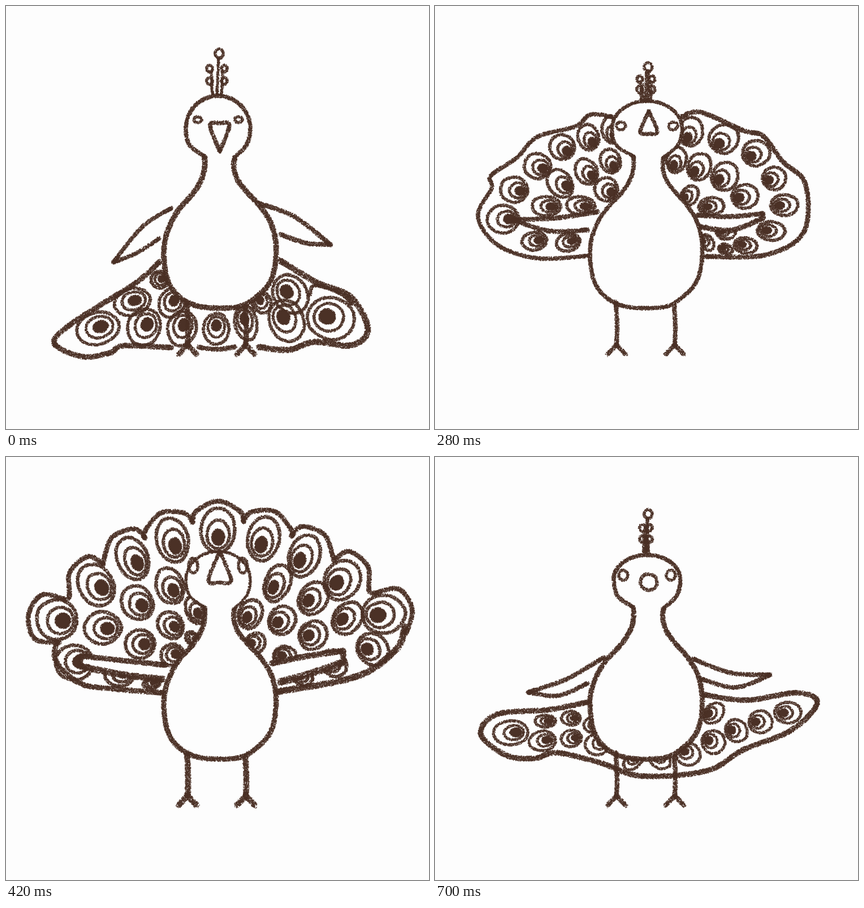
These frames come from a looping animation (748 px wide and 748 px high, 0.84 s). An HTML page with a canvas:

```html
<!DOCTYPE html>
<html lang="en">
<head>
<meta charset="utf-8">
<title>Peacock</title>
<style>
html, body { margin: 0; width: 100%; height: 100%; overflow: hidden; background: #fdfdfd; }
canvas { display: block; width: 748px; height: 748px; }
</style>
</head>
<body>
<canvas id="stage" width="748" height="748"></canvas>
<script>
const SIZE = 748, HOLD = 140, INK = '#4b3126', PAPER = '#fdfdfd', MID = 375;
let g, seed;

function rnd() {
  seed = (seed * 1664525 + 1013904223) >>> 0;
  return seed / 4294967296;
}

const parse = s => s.trim().split(/\s+/).map(p => p.split(',').map(Number));

// Catmull-Rom curve sampled about once per pixel; extra values per point blend along
function smooth(pts, closed) {
  const n = pts.length, out = [];
  const at = i => closed ? pts[(i + n) % n] : pts[Math.max(0, Math.min(n - 1, i))];
  for (let i = 0; i < (closed ? n : n - 1); i++) {
    const a = at(i - 1), b = at(i), c = at(i + 1), d = at(i + 2);
    const steps = Math.max(1, Math.round(Math.hypot(c[0] - b[0], c[1] - b[1])));
    for (let k = 0; k < steps; k++) {
      const t = k / steps;
      out.push(b.map((v, j) => v + 0.5 * ((c[j] - a[j]) * t
        + (2 * a[j] - 5 * v + 4 * c[j] - d[j]) * t * t
        + (3 * v - a[j] - 3 * c[j] + d[j]) * t * t * t)));
    }
  }
  out.push(at(closed ? 0 : n - 1));
  return out;
}

// Crayon grain: small specks scattered over the width of the line
function chalk(curve, w, density = 1.5) {
  g.fillStyle = INK;
  for (const [x, y] of curve) {
    for (let i = rnd(); i < w * density; i++) {
      const r = Math.sqrt(rnd()) * w * 0.54, a = rnd() * 6.283, s = 0.9 + rnd() * 0.7;
      g.fillRect(x + r * Math.cos(a) - s / 2, y + r * Math.sin(a) - s / 2, s, s);
    }
  }
}

const line = (pts, w, density) => chalk(smooth(pts), w, density);
const draw = (text, w, density) => line(parse(text), w, density);

function mask(curve) {
  g.fillStyle = PAPER;
  g.beginPath();
  curve.forEach(p => g.lineTo(p[0], p[1]));
  g.fill();
}

function ring(x, y, rx, ry, w = 5, rot = 0) {
  const pts = [], c = Math.cos(rot), s = Math.sin(rot);
  for (let i = 0; i < 10; i++) {
    const a = i * Math.PI / 5, k = 0.97 + rnd() * 0.06;
    const u = rx * k * Math.cos(a), v = ry * k * Math.sin(a);
    pts.push([x + u * c - v * s, y + u * s + v * c]);
  }
  chalk(smooth(pts, true), w, 1.25);
}

function dot(x, y, rx, ry, rot) {
  g.fillStyle = INK;
  g.beginPath();
  g.ellipse(x, y, rx, ry, rot, 0, 7);
  g.fill();
  ring(x, y, rx, ry, 3, rot);
}

// Rows of feather eyes: each one tilts half-way to the hub, its pupil slides towards it
function feathers([hx, hy], lean, w, mid, pupil) {
  const eye = ([x, y, rx, ry]) => {
    const dx = hx - x, dy = hy - y, far = Math.hypot(dx, dy);
    const rot = (rx > ry ? Math.atan(dy / dx) : Math.atan(-dx / dy)) / 2;
    const px = x + dx / far * ry * lean, py = y + dy / far * ry * lean;
    ring(x, y, rx - w / 2, ry - w / 2, w, rot);
    ring(x + (px - x) * 0.6, y + (py - y) * 0.6, rx * mid, ry * mid, w * 0.9, rot);
    dot(px, py, rx * pupil, ry * pupil, rot);
  };
  // Knots are x,y,rx,ry; gaps along the row follow the eye width
  return (knots, count) => {
    const curve = smooth(parse(knots)), eyes = [curve[0]], way = [0];
    for (let i = 1; i < curve.length; i++) {
      const [a, b] = [curve[i - 1], curve[i]];
      way.push(way[i - 1] + Math.hypot(b[0] - a[0], b[1] - a[1]) / b[2]);
    }
    for (let i = 1; i < count; i++) {
      const goal = way[way.length - 1] * i / (count - 1) - 1e-6;
      eyes.push(curve[way.findIndex(v => v >= goal)]);
    }
    eyes.forEach(eye);
    return eyes;
  };
}

// One scallop around the outer side of each eye
function scallops(eyes, [hx, hy], reach, w) {
  const polar = ([x, y]) => [Math.atan2(y - hy, x - hx), Math.hypot(x - hx, y - hy)];
  const spot = (a, r) => [hx + r * Math.cos(a), hy + r * Math.sin(a)];
  const valley = (p, q) => {
    const [a, r] = polar([(p[0] + q[0]) / 2, (p[1] + q[1]) / 2]);
    return spot(a, r + reach * 0.45);
  };
  eyes.forEach((e, i) => {
    const [a] = polar(e), arc = [];
    for (const turn of [-0.85, 0, 0.85]) {
      arc.push([e[0] + reach * 0.98 * Math.cos(a + turn), e[1] + reach * Math.sin(a + turn)]);
    }
    if (i > 0) arc.unshift(valley(eyes[i - 1], e));
    else arc.unshift([e[0] + 5, e[1] + 40]);
    if (i < eyes.length - 1) arc.push(valley(e, eyes[i + 1]));
    else arc.push([e[0] + 36, e[1] + 30]);
    line(arc, w);
  });
}

// Head is an arc; the belly sways sideways below the neck
function body(sway, top, half, w, headW) {
  const belly = parse(`404,268 403,288 411,310 428,331 450,355 468,383 477,418 476,457 467,488
    447,511 415,531 365,534 330,528 304,512 287,488 280,455 280,422 288,392 304,362
    331,331 345,308 351,287 351,266`)
    .map(([x, y]) => [x + sway * Math.max(0, Math.min(1, (y - 300) / 100)), y]);
  const head = [];
  for (let a = 210; a >= -30; a -= 24) {
    const t = a * Math.PI / 180, s = Math.sin(t);
    head.push([MID + half * Math.cos(t), 217 - s * (s > 0 ? 217 - top : 60)]);
  }
  mask(smooth([...head, ...belly], true));
  line([belly[belly.length - 1], ...head, belly[0]], headW);
  line(belly, w);
}

function legs(w) {
  for (const [x, top] of [[320, 523], [423, 530]]) {
    line([[x, top], [x + 2, 565], [x + 1, 600]], w);
    for (const side of [-1, 1]) line([[x + 1, 599], [x + 1 + side * 16, 616]], w);
  }
}

// Two sagging strokes from the shoulder to the tip and back
function wing(top, tip, low, sagTop, sagLow, w, blunt = 0) {
  const stroke = (a, b, sag) => smooth([a, [(a[0] + b[0]) / 2, (a[1] + b[1]) / 2 + sag], b]);
  const up = [tip[0], tip[1] - blunt], down = [tip[0], tip[1] + blunt];
  const upper = stroke(top, up, sagTop), lower = stroke(down, low, sagLow);
  mask([...upper, ...lower]);
  chalk(upper, w);
  chalk(lower, w + blunt / 4);
  if (blunt) line([up, down], w);
}

function face(gap, y, rx, ry) {
  for (const side of [-1, 1]) ring(MID + side * gap, y, rx, ry, 5);
}

function beak(tip, base, half, w) {
  const x = 378, point = [x, tip], bow = Math.sign(base - tip) * 4;
  chalk(smooth([point, point, [x + half, base], [x, base + bow], [x - half, base]], true), w);
}

function crest(top, base, spread, stem) {
  const x = 373, h = base - top;
  ring(x + 4, top + 8, 7, 8, 5);
  line([[x, base], [x + 3, top + 15]], stem);
  for (const part of [0.43, 0.7]) {
    for (const side of [-1, 1]) {
      const y = top + h * part, bx = x + side * spread;
      ring(bx, y, 5, 6, 5);
      line([[x + side * spread * 0.6, base], [bx - side * 3, y + 5]], stem, 0.8);
    }
  }
}

function resting() {
  const row = feathers([378, 440], 0.2, 5.5, 0.6, 0.32);
  draw('272,452 232,488 170,527 105,570 86,598 135,620 185,613 206,601 292,604', 9);
  draw('340,603 372,607 405,603', 8);
  draw('447,603 500,608 545,594 610,600 640,572 610,515 550,489 484,450', 10);
  draw('537,512 546,494 590,508 612,528', 6);
  row('162,570,41,31 248,568,31,36 374,571,25,30 424,560,22,34', 5);
  row('223,523,35,26 293,525,25,29', 2);
  row('272,484,18,18', 1);
  row('452,524,19,22 503,509,32,38', 2);
  row('496,556,33,40 575,553,44,40', 2);
  wing([293, 357], [190, 453], [271, 411], -15, 5, 7);
  wing([444, 348], [574, 422], [486, 404], -13, 6, 8);
  body(0, 159, 57, 9, 7);
  legs(9);
  face(36, 201, 7, 5);
  beak(257, 211, 17, 7);
  crest(76, 157, 13, 5);
}

function rising() {
  const row = feathers([375, 465], 0.38, 5, 0.52, 0.3);
  draw(`272,433 200,447 110,455 81,490 125,527 175,533 215,523 290,540 365,564 480,555
    545,518 630,483 676,435 640,417 550,430 474,420`, 9);
  row('134,488,33,24', 1);
  row('195,467,21,13 243,462,19,15 276,474,15,15', 3);
  row('190,502,26,20 245,498,20,17 287,508,24,21', 3);
  row('350,538,21,15 448,525,25,22 525,487,21,23 624,452,26,21', 7);
  row('493,453,18,23', 1);
  wing([299, 354], [165, 416], [270, 400], 8, 14, 7.5);
  wing([456, 357], [593, 385], [470, 392], 11, 19, 7.5);
  body(-5, 173, 59, 8.5, 7);
  legs(8);
  face(42, 209, 8, 9);
  ring(378, 221, 15, 14, 6);
  crest(93, 168, 6, 6);
}

function spreading() {
  const row = feathers([378, 370], 0.42, 5.5, 0.53, 0.3);
  draw('314,196 275,192 248,213 180,232 145,268 99,300 100,322 76,372 110,422 180,446 270,442', 7);
  draw('436,196 470,188 545,220 580,230 615,275 655,315 652,400 585,440 478,443', 8);
  row('140,325,27,25 215,255,25,25 311,220,18,26', 5);
  row('221,314,23,29 310,274,20,24', 3);
  row('197,354,28,20 262,352,28,19 303,324,23,23', 3);
  row('120,377,31,27 170,414,25,19 235,418,24,18', 3);
  row('452,222,24,28 508,234,29,28 568,260,27,25', 3);
  row('427,272,20,25 514,302,26,28 548,337,26,24', 4);
  row('450,335,17,21 489,354,25,18', 2);
  row('600,305,23,23 618,370,28,20 563,418,25,18 514,430,15,11', 5);
  row('514,399,20,16 481,418,13,18', 2);
  wing([288, 364], [137, 378], [270, 396], 4, 11, 8);
  wing([463, 370], [580, 371], [467, 390], 4, 14, 8, 4);
  body(-5, 168, 62, 7, 6);
  legs(7.5);
  face(46, 212, 8, 7);
  beak(186, 222, 15, 6.5);
  crest(100, 168, 11, 8);
}

function fanned() {
  const hub = [376, 330], row = feathers(hub, 0.28, 6, 0.6, 0.33);
  const rim = row('90,288,39,39 222,180,30,42 378,130,33,42 538,180,30,41 668,278,41,37', 9);
  scallops(rim, hub, 52, 8);
  draw('90,326 88,360 130,400 190,410 278,417', 9);
  draw('705,300 690,340 620,388 480,415', 11);
  row('171,302,35,31 225,262,30,34 290,228,27,35', 3);
  row('237,331,29,28 335,270,20,28', 3);
  row('294,350,23,22 330,322,13,18', 2);
  row('121,363,36,34 195,383,30,24 258,400,18,13', 3);
  row('480,223,25,37 540,248,27,34 604,285,27,34', 3);
  row('432,278,23,29 490,290,26,29 543,315,27,29', 3);
  row('440,330,20,23 493,352,23,20', 2);
  row('648,340,29,33 588,362,25,29 525,389,20,18', 3);
  wing([283, 368], [132, 361], [277, 393], 0, 3, 9, 9);
  wing([470, 365], [596, 353], [485, 398], -2, 2, 10, 10);
  body(0, 167, 57, 8.5, 5);
  legs(10);
  face(44, 192, 8, 13);
  beak(167, 218, 20, 6.5);
}

const poses = [resting, rising, spreading, fanned].map((paint, i) => {
  const sheet = document.createElement('canvas');
  sheet.width = sheet.height = SIZE;
  g = sheet.getContext('2d');
  g.fillStyle = PAPER;
  g.fillRect(0, 0, SIZE, SIZE);
  seed = 71 + i * 997;
  paint();
  return sheet;
});

// The fan opens, then closes through the same poses
const order = [0, 1, 2, 3, 2, 1];
const stage = document.getElementById('stage').getContext('2d');

function show(now) {
  const step = Math.floor(Math.max(0, now) / HOLD) % order.length;
  stage.drawImage(poses[order[step]], 0, 0);
  requestAnimationFrame(show);
}
show(performance.now());
</script>
</body>
</html>
```
